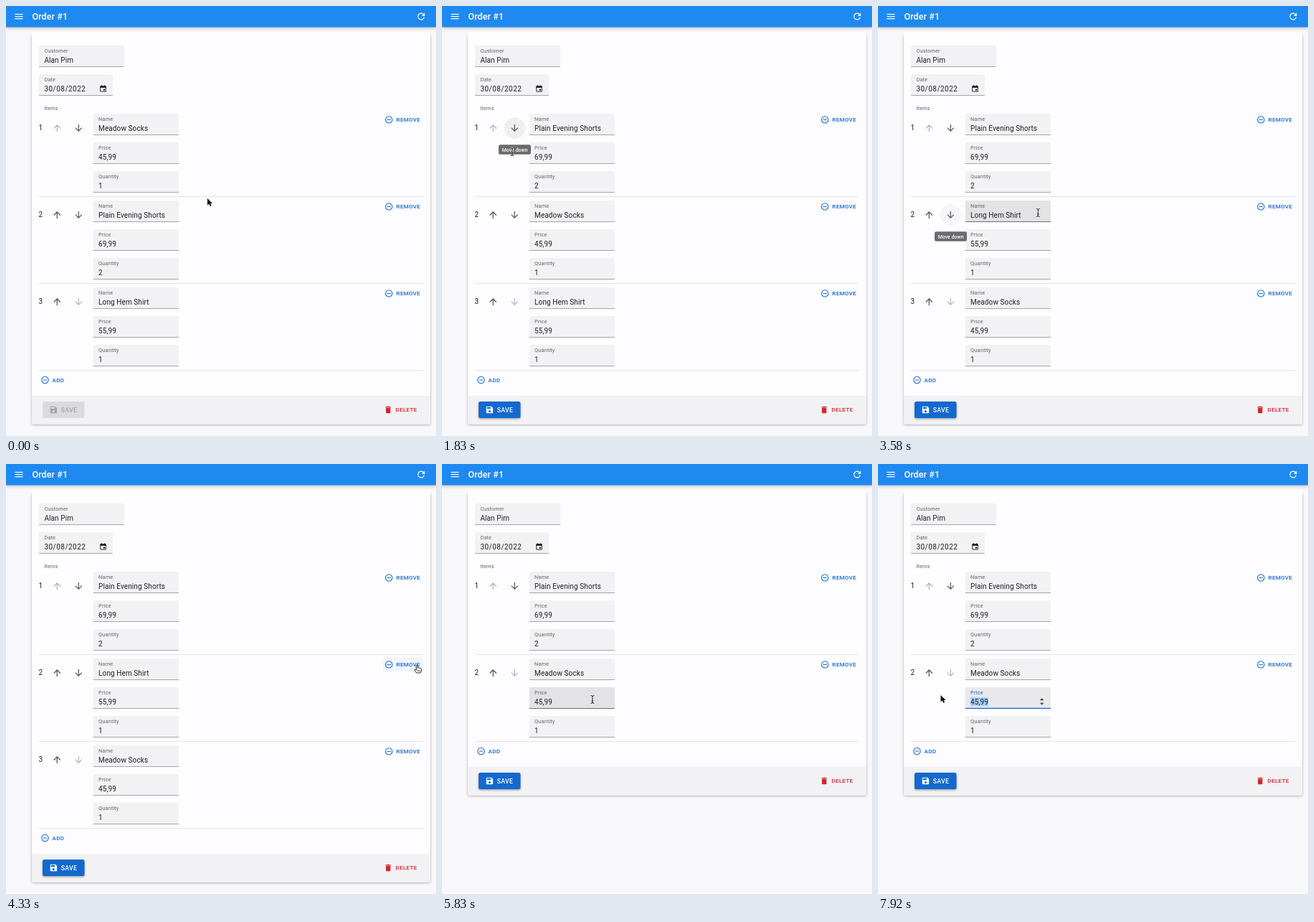
An HTML page with a canvas for the animation above (8 s loop, 600 by 599 pixels).

```html
<!DOCTYPE html>
<html lang="en">
<head>
<meta charset="utf-8">
<title>Order #1</title>
<style>
  html, body { margin: 0; width: 100%; height: 100%; overflow: hidden; background: #f8f7fa; }
  canvas { display: block; width: 600px; height: 599px; }
</style>
</head>
<body>
<canvas id="stage"></canvas>
<script>
const W = 600, H = 599, LOOP = 8000, STEP = 1000 / 12, ROW = 121;
const canvas = document.getElementById('stage');
const ctx = canvas.getContext('2d');
const dpr = window.devicePixelRatio || 1;
canvas.width = W * dpr;
canvas.height = H * dpr;

const BLUE = '#1469cd', RED = '#d3242b', INK = '#1f1e20', GREY = '#666568';
const CARD = '#fdfcfe', FOOT = '#f2f1f3';

const meadow = ['Meadow Socks', '45,99', '1'];
const plain = ['Plain Evening Shorts', '69,99', '2'];
const long = ['Long Hem Shirt', '55,99', '1'];

// Moments of the clicks
const SWAP1 = 1160, SWAP2 = 2740, REMOVE = 4660, FOCUS = 6490, RELEASE = 7240;

// Pointer path: time, x, y
const path = [
  [0, 281, 268], [250, 228, 240], [500, 132, 196], [750, 99, 177], [833, 98, 175],
  [1667, 98, 175], [1833, 98, 203], [2083, 99, 262], [2333, 100, 295],
  [3417, 100, 295], [3583, 223, 288], [3833, 455, 283], [4083, 560, 281], [4250, 573.5, 280],
  [5333, 573.5, 280], [5583, 390, 306], [5833, 210, 328], [6083, 159, 331],
  [6417, 159, 331], [6667, 118.5, 330.5], [6833, 88, 330], [6917, 88, 330],
  [7167, 111, 331], [7250, 111, 331], [7333, 87.5, 322]
];

const SAVE_ICON = new Path2D('M17 3H5c-1.1 0-2 .9-2 2v14c0 1.1.9 2 2 2h14c1.1 0 2-.9 2-2V7l-4-4zm-5 16a3 3 0 1 1 0-6 3 3 0 0 1 0 6zm3-10H5V5h10z');
const BIN_ICON = new Path2D('M6 19c0 1.1.9 2 2 2h8c1.1 0 2-.9 2-2V7H6zM19 4h-3.5l-1-1h-5l-1 1H5v2h14z');
const UP_ICON = new Path2D('M4 12l1.4 1.4L11 7.8V20h2V7.8l5.6 5.6L20 12l-8-8z');
const ARROW = new Path2D('M0 0V9.6L2.2 7.6 3.8 11.1 5.6 10.3 4.1 6.9H7.1z');
const HAND = new Path2D('M-1 1C-1-.4 1-.4 1 1V4.2C1.3 3.3 2.7 3.5 2.8 4.5 3.3 3.8 4.4 4.1 4.5 5 5.2 4.5 6 5 6 5.8V8L5 11H-.8L-3.4 7.2C-3.7 6-2.4 5.6-1.8 6.3L-1 7.2z');

const clamp = (v) => Math.max(0, Math.min(1, v));
const fade = (t, on, off, d = 160) => clamp((t - on) / d) * clamp((off + d - t) / d);
const inside = (p, x, y, w, h) => p.x >= x && p.x <= x + w && p.y >= y && p.y <= y + h;

function pointerAt(t) {
  let i = 0;
  while (i < path.length - 2 && t > path[i + 1][0]) i++;
  const [t0, x0, y0] = path[i], [t1, x1, y1] = path[i + 1];
  const k = clamp((t - t0) / (t1 - t0));
  return { x: x0 + (x1 - x0) * k, y: y0 + (y1 - y0) * k };
}

function itemsAt(t) {
  if (t < SWAP1) return [meadow, plain, long];
  if (t < SWAP2) return [plain, meadow, long];
  if (t < REMOVE) return [plain, long, meadow];
  return [plain, meadow];
}

function text(s, x, y, size, color, weight = 400, spacing = .0094) {
  ctx.font = `${weight} ${size}px Roboto, sans-serif`;
  ctx.letterSpacing = size * spacing + 'px';
  ctx.fillStyle = color;
  ctx.fillText(s, x, y);
}

function box(x, y, w, h, color, r = 0) {
  ctx.fillStyle = color;
  ctx.beginPath();
  ctx.roundRect(x, y, w, h, r);
  ctx.fill();
}

function shadowBox(x, y, w, h, color, r, blur, dy, alpha) {
  ctx.save();
  ctx.shadowColor = `rgba(0,0,0,${alpha})`;
  ctx.shadowBlur = blur * dpr;
  ctx.shadowOffsetY = dy * dpr;
  box(x, y, w, h, color, r);
  ctx.restore();
}

function disc(x, y, r, color) {
  ctx.fillStyle = color;
  ctx.beginPath();
  ctx.arc(x, y, r, 0, 7);
  ctx.fill();
}

// Draws a 24-unit icon centred on a point
function icon(shape, x, y, size, color, turn = 0) {
  ctx.save();
  ctx.translate(x, y);
  ctx.rotate(turn);
  ctx.scale(size / 24, size / 24);
  ctx.translate(-12, -12);
  ctx.fillStyle = color;
  ctx.fill(shape, 'evenodd');
  ctx.restore();
}

function circleSign(x, y, plus) {
  ctx.strokeStyle = BLUE;
  ctx.lineWidth = 1.04;
  ctx.beginPath();
  ctx.arc(x, y, 4.7, 0, 7);
  ctx.moveTo(x - 2.6, y);
  ctx.lineTo(x + 2.6, y);
  if (plus) {
    ctx.moveTo(x, y - 2.6);
    ctx.lineTo(x, y + 2.6);
  }
  ctx.stroke();
}

function triangle(x, y, w, h, color) {
  ctx.fillStyle = color;
  ctx.beginPath();
  ctx.moveTo(x - w, y);
  ctx.lineTo(x + w, y);
  ctx.lineTo(x, y + h);
  ctx.fill();
}

function field(label, value, x, y, w, p, o = {}) {
  const hot = inside(p, x, y, w, 29.5);
  box(x, y, w, 29.6, o.focus ? '#e9e8eb' : hot ? '#e3e2e4' : FOOT, [2.5, 2.5, 0, 0]);
  if (o.focus) box(x, y + 28.7, w, 1.3, BLUE);
  else box(x, y + 29, w, .75, hot ? '#444' : '#8b8a8c');
  text(label, x + 7.4, y + 10.4, 7.5, o.focus ? BLUE : GREY);
  if (o.focus) {
    ctx.font = '400 10px Roboto, sans-serif';
    ctx.letterSpacing = '.094px';
    const full = ctx.measureText(value).width;
    const from = ctx.measureText(value.slice(0, o.from)).width;
    box(x + 7.4 + from, y + 14, full - from, 12.2, '#a6cdf8');
    triangle(x + 107, y + 18.3, 2.6, -3, '#333');
    triangle(x + 107, y + 21.7, 2.6, 3, '#333');
  }
  text(value, x + 7.4, y + 23.5, 10, INK, 400, o.spacing);
}

function calendar(x, y) {
  box(x, y + 1, 8.4, 8.3, '#111', 1);
  box(x + .9, y + 3.6, 6.6, 4.8, FOOT);
  box(x + 1.4, y, 1, 2, '#111');
  box(x + 6, y, 1, 2, '#111');
  box(x + 4.6, y + 5.5, 2, 2, '#111');
}

function appBar() {
  shadowBox(0, -5, W, 34.6, '#1e89f0', 0, 5, 1.5, .28);
  for (let i = -1; i < 2; i++) box(12.4, 14 + i * 3.1, 11.2, 1.2, '#fff');
  text('Order #1', 36.5, 18.8, 12.5, '#fff', 500, .0075);
  ctx.save();
  ctx.translate(579.3, 14.5);
  ctx.scale(.625, .625);
  ctx.strokeStyle = ctx.fillStyle = '#fff';
  ctx.lineWidth = 2;
  ctx.beginPath();
  ctx.arc(0, 0, 7, .29, -.78);
  ctx.stroke();
  ctx.beginPath();
  ctx.moveTo(1, -1);
  ctx.lineTo(8, -1);
  ctx.lineTo(8, -8);
  ctx.fill();
  ctx.restore();
}

function itemRow(item, i, count, p, t) {
  const y = 150 + ROW * i;
  const focus = i === 1 && t >= FOCUS;
  const from = [4, 3, 1, 0][Math.min(3, Math.floor((t - FOCUS) / STEP))];
  text(i + 1, 45.5, y + 23.4, 10, INK);
  icon(UP_ICON, 71.3, y + 20, 15, i ? '#555457' : '#b3b2b5');
  icon(UP_ICON, 101.3, y + 20, 15, i < count - 1 ? '#555457' : '#b3b2b5', Math.PI);
  field('Name', item[0], 121.7, y, 119.3, p);
  field('Price', item[1], 121.7, y + 40, 119.3, p, focus ? { focus, from } : {});
  field('Quantity', item[2], 121.7, y + 80, 119.3, p);
  if (t < REMOVE && inside(p, 526, y - 2, 56, 20)) box(526, y - 1.5, 56, 19.5, 'rgba(20,105,205,.05)', 2.5);
  circleSign(534.3, y + 8.4);
  text('REMOVE', 544.6, y + 11.3, 8.125, BLUE, 500, .0286);
  box(46, y + 115.2, 536, .75, '#dddcdf');
}

function ripple(y, t, click) {
  const age = t - click + 170;
  if (age < 0 || age > 550) return;
  const a = .12 * clamp((550 - age) / 250);
  disc(101.3, y, 15 * clamp(.3 + age / 300), `rgba(0,0,0,${a})`);
}

function buttonGlow(t) {
  const first = fade(t, 600, 1850), second = fade(t, 2200, 3500);
  disc(101.3, 170, 14.8, `rgba(0,0,0,${.055 * first})`);
  disc(101.3, 291, 14.8, `rgba(0,0,0,${.055 * second})`);
  ripple(170, t, SWAP1);
  ripple(291, t, SWAP2);
}

function tooltip(y, a) {
  if (!a) return;
  ctx.save();
  ctx.globalAlpha = a;
  ctx.translate(101.5, y);
  ctx.scale(.8 + .2 * a, .8 + .2 * a);
  box(-22.5, -6.7, 45, 13.4, '#6c6a6e', 2.5);
  text('Move down', -17.8, 2.5, 6.875, '#fff', 500);
  ctx.restore();
}

function footer(count, t) {
  const y = 180 + ROW * count;
  const live = t >= SWAP1;
  circleSign(54.5, y - 22);
  text('ADD', 64.5, y - 19, 8.125, BLUE, 500, .0286);
  box(36, y, 556, 39.5, FOOT, [0, 0, 2.5, 2.5]);
  if (live) shadowBox(51, y + 8, 58.5, 23, BLUE, 2.5, 3, 1.2, .35);
  else box(51, y + 8, 58.5, 23, '#dbdadc', 2.5);
  const ink = live ? '#fff' : '#a5a4a7';
  icon(SAVE_ICON, 66.4, y + 19.5, 12.5, ink);
  text('SAVE', 76.8, y + 22.6, 8.75, ink, 500, .0286);
  icon(BIN_ICON, 533.3, y + 19.5, 12.5, RED);
  text('DELETE', 543.6, y + 22.4, 8.125, RED, 500, .0286);
}

function pointerKind(p, count, tips, t) {
  if (t >= FOCUS && t < RELEASE) return 'text';
  if (tips.some((a, i) => a > .3 && inside(p, 79, 193 + ROW * i, 45, 14))) return 'text';
  if (inside(p, 46, 55, 119, 30)) return 'text';
  for (let i = 0; i < count; i++) {
    const y = 150 + ROW * i;
    if (i < count - 1 && Math.hypot(p.x - 101.3, p.y - y - 20) < 15) return 'hand';
    if (inside(p, 526, y - 2, 56, 20)) return 'hand';
    for (let k = 0; k < 3; k++) if (inside(p, 121.7, y + 40 * k, 119.3, 30)) return 'text';
  }
  return 'arrow';
}

function pointer(p, kind) {
  ctx.save();
  ctx.translate(p.x, p.y);
  ctx.lineJoin = 'round';
  if (kind === 'text') {
    ctx.beginPath();
    for (const s of [-1, 1]) {
      ctx.moveTo(-2.4, 5.5 * s);
      ctx.quadraticCurveTo(0, 5.5 * s, 0, 4 * s);
      ctx.quadraticCurveTo(0, 5.5 * s, 2.4, 5.5 * s);
    }
    ctx.moveTo(0, -4.5);
    ctx.lineTo(0, 4.5);
    ctx.moveTo(-1.3, 2);
    ctx.lineTo(1.3, 2);
    for (const [w, c] of [[2.4, 'rgba(255,255,255,.8)'], [1, '#111']]) {
      ctx.lineWidth = w;
      ctx.strokeStyle = c;
      ctx.stroke();
    }
  } else if (kind === 'hand') {
    ctx.fillStyle = '#fff';
    ctx.strokeStyle = '#111';
    ctx.lineWidth = .9;
    ctx.fill(HAND);
    ctx.stroke(HAND);
    ctx.lineWidth = .6;
    for (const x of [.8, 2.3, 3.8]) {
      ctx.beginPath();
      ctx.moveTo(x, 7);
      ctx.lineTo(x, 9.3);
      ctx.stroke();
    }
  } else {
    ctx.strokeStyle = '#fff';
    ctx.lineWidth = 1.5;
    ctx.stroke(ARROW);
    ctx.fillStyle = '#111';
    ctx.fill(ARROW);
  }
  ctx.restore();
}

function draw(t) {
  const p = pointerAt(t), items = itemsAt(t), count = items.length;
  const tips = [fade(t, 660, 1850), fade(t, 2260, 3590)];
  ctx.setTransform(dpr, 0, 0, dpr, 0, 0);
  box(0, 0, W, H, '#f8f7fa');
  shadowBox(36, 40, 556, 179.5 + ROW * count, CARD, 2.5, 3.5, 1, .32);
  box(36, 36, 556, 10, CARD, 2.5);
  appBar();
  field('Customer', 'Alan Pim', 46, 55, 119, p);
  field('Date', '30/08/2022', 46, 95, 103, p, { spacing: .048 });
  calendar(131.3, 110.2);
  text('Items', 53.4, 145.4, 7.5, GREY);
  buttonGlow(t);
  items.forEach((item, i) => itemRow(item, i, count, p, t));
  footer(count, t);
  tips.forEach((a, i) => tooltip(200 + ROW * i, a));
  pointer(p, pointerKind(p, count, tips, t));
}

const start = performance.now();
function tick() {
  const t = (performance.now() - start) % LOOP;
  draw(Math.floor((t + 4) / STEP) * STEP % LOOP);
  requestAnimationFrame(tick);
}
tick();
</script>
</body>
</html>
```
